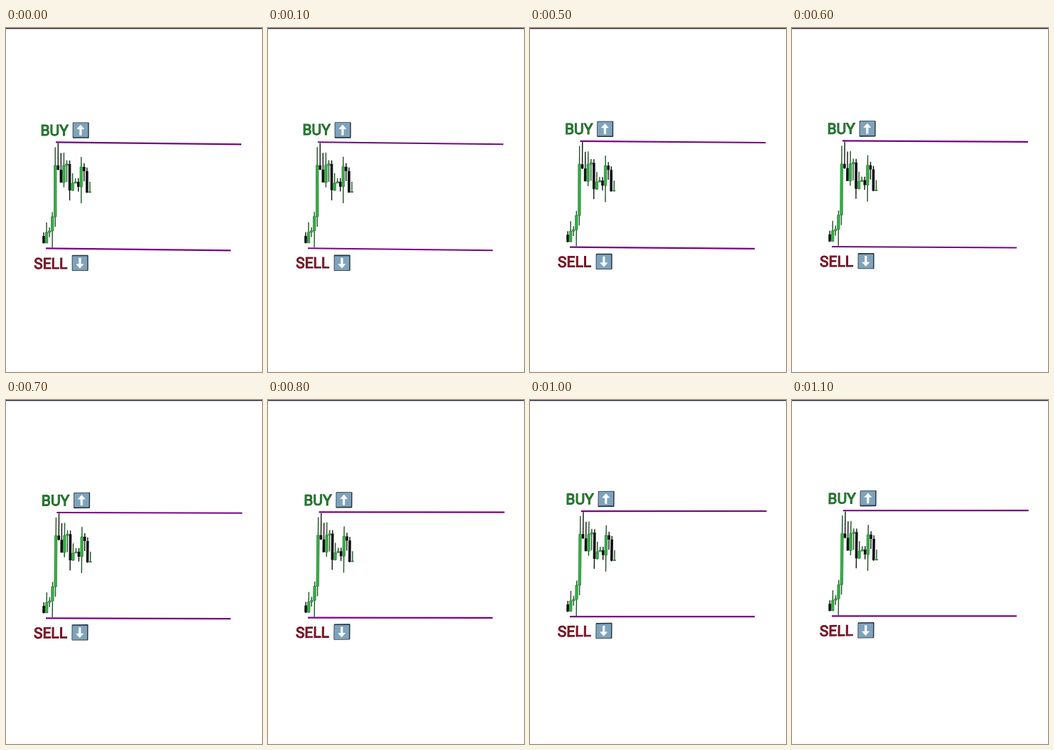
Write an HTML page that moves like this. It is 360 by 483 pixels and loops after 1.2 s.

```html
<!DOCTYPE html>
<html lang="en">
<head>
<meta charset="utf-8">
<title>Buy and sell levels</title>
<style>
  html, body { margin: 0; width: 100%; height: 100%; overflow: hidden; background: #fff; }
  svg { display: block; width: 360px; height: 483px; }
  text { font: 400 21px Roboto, Arial, sans-serif; stroke-width: 1; text-rendering: geometricPrecision; }
  .level { stroke: #760682; stroke-width: 2.2; }
  .wick { stroke: #101810; stroke-width: 1.4; }
  .body { fill: #0c0f12; }
  .up .wick { stroke: #1f5427; }
  .up .body { fill: #35b044; stroke: #226f2c; stroke-width: .6; }
</style>
</head>
<body>
<svg viewBox="0 0 360 483">
  <defs>
    <g id="tile">
      <rect x=".4" y=".4" width="23" height="22.4" rx="1" fill="#26323c"/>
      <rect x="1.2" y="1.2" width="20.8" height="20" rx=".6" fill="#7fa3bd"/>
      <path d="M11.6 4.2 16.6 9.8H12.9V18.4H10.3V9.8H6.6Z" fill="#fff" stroke="#fff" stroke-width=".6" stroke-linejoin="round"/>
    </g>
  </defs>
  <rect width="360" height="1.3" fill="#25253a"/>
  <rect y="481" width="360" height="2" fill="#fafafa"/>
  <g id="chart">
    <g id="candles"></g>
    <path class="level" d="M70 160.4 331 163.4M56 309.4 316 312.4"/>
    <text x="48.5" y="150.6" fill="#27a037" stroke="#195723">BUY</text>
    <text x="39.2" y="337.5" fill="#ab122a" stroke="#5c101e">SELL</text>
    <use href="#tile" x="93.3" y="132"/>
    <use href="#tile" transform="matrix(1 0 0 -1 92.3 341.5)"/>
  </g>
</svg>
<script>
// Each candle opens at the previous close; y grows downwards
const closes = [292, 302, 287, 285, 265, 193, 199, 217, 193, 191, 228, 218, 216, 223, 195, 201, 231, 230];
const wave = (i, peak, period) => Math.cos((i - peak) / period * 2 * Math.PI);

function candle(i) {
  const x = 53 + i * 4.06, open = closes[i], close = closes[i + 1];
  const top = Math.min(open, close), end = Math.max(open, close);
  // Upper wicks stretch around the spike, lower wicks come in waves
  const spike = 27 * Math.exp(-(((i - 5.2) / 1.3) ** 2));
  const high = top - 8 - 6 * wave(i, 10, 3) - spike;
  const low = end + 6 * (1 + wave(i, 3.2, 5)) ** 2;
  return `<g class="${close < open ? 'up' : 'down'}"><path class="wick" d="M${x} ${high}V${low}"/>` +
    `<rect class="body" x="${x - 1.8}" y="${top}" width="3.6" height="${end - top}"/></g>`;
}
document.getElementById('candles').innerHTML = closes.slice(1).map((_, i) => candle(i)).join('');

const chart = document.getElementById('chart');
const smooth = p => (p = Math.min(1, Math.max(0, p)), p * p * (3 - 2 * p));

// The view rises steadily and levels out, pivoting on the lower line's left end (56, 309)
function draw() {
  const step = Math.floor(performance.now() % 1200 / 100);
  const lift = 6 * (step / 11) ** 1.5;
  const turn = smooth((step - 3) / 6);
  const slope = 3 * turn / 260, shrink = turn / 149, skew = 1.9 * turn / 166;
  chart.setAttribute('transform', `matrix(1 ${-slope} ${-skew} ${1 - shrink} ` +
    `${309 * skew} ${309 * shrink + 56 * slope - lift})`);
  requestAnimationFrame(draw);
}
draw();
</script>
</body>
</html>
```
